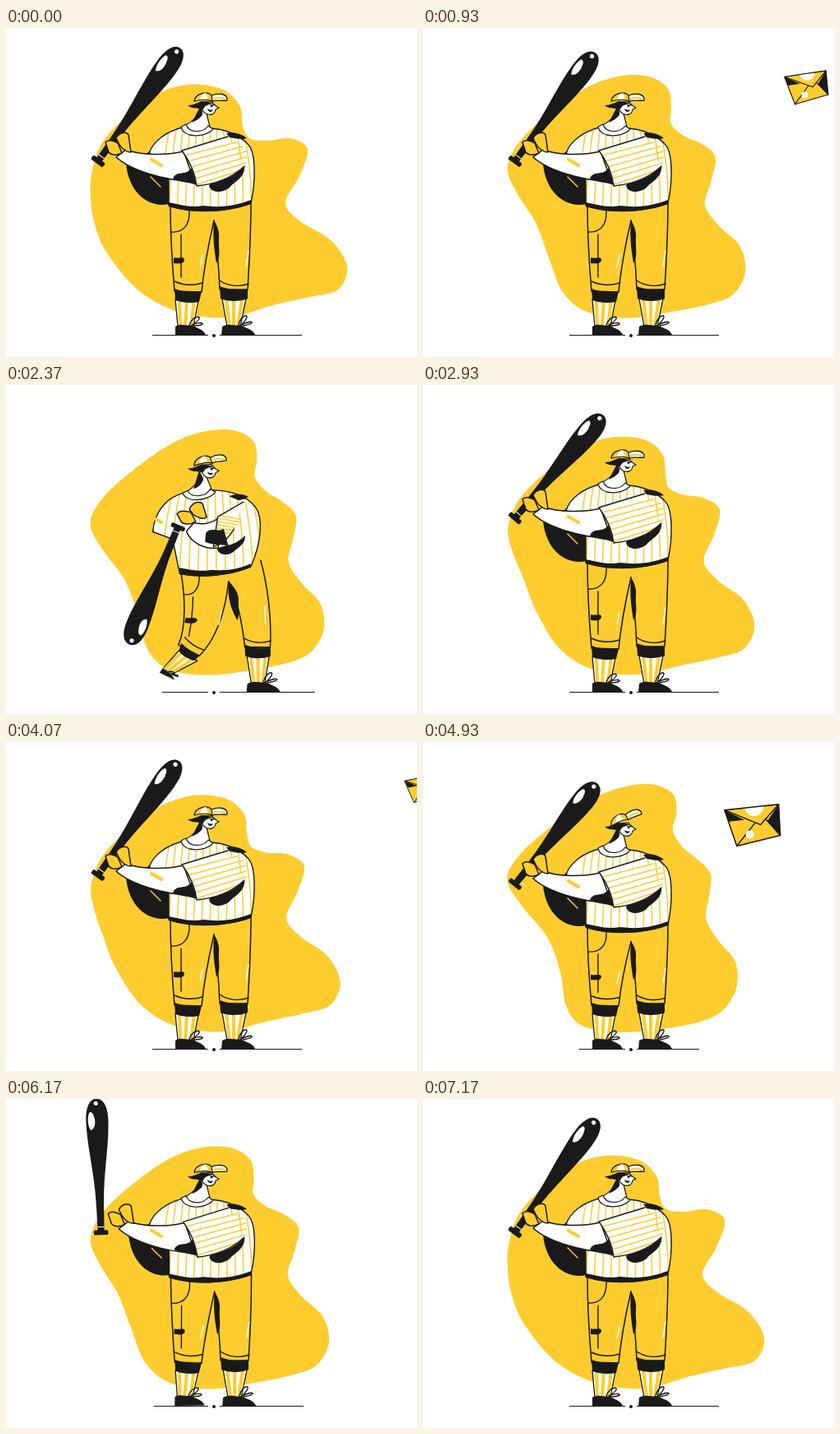
These frames come from a looping animation (500x400 px, 7.21 s). An HTML page with a canvas:

```html
<!DOCTYPE html>
<html lang="en">
<head>
<meta charset="utf-8">
<title>Batter</title>
<style>
html, body { margin: 0; width: 100%; height: 100%; overflow: hidden; background: #fff; }
canvas { display: block; }
</style>
</head>
<body>
<canvas id="stage" width="500" height="400"></canvas>
<script>
const ctx = document.getElementById('stage').getContext('2d');
const YELLOW = '#fdcc2f', BLACK = '#1a1a1a', WHITE = '#fff';
const LOOP = 7210, CYCLE = LOOP / 2;
const clamp = v => Math.max(0, Math.min(1, v));
const lerp = (a, b, k) => a + (b - a) * k;

// Monotone cubic through [time, value] keys
function track(...keys) {
  const n = keys.length;
  const rate = i => (keys[i + 1][1] - keys[i][1]) / (keys[i + 1][0] - keys[i][0]);
  const slope = keys.map((_, i) => {
    if (!i || i === n - 1) return 0;
    const a = rate(i - 1), b = rate(i);
    return a * b <= 0 ? 0 : 2 * a * b / (a + b);
  });
  return t => {
    if (t <= keys[0][0]) return keys[0][1];
    if (t >= keys[n - 1][0]) return keys[n - 1][1];
    let i = 0;
    while (t > keys[i + 1][0]) i++;
    const [t0, a] = keys[i], [t1, b] = keys[i + 1];
    const h = t1 - t0, k = (t - t0) / h, k2 = k * k, k3 = k2 * k;
    return a * (2 * k3 - 3 * k2 + 1) + b * (3 * k2 - 2 * k3)
      + h * (slope[i] * (k3 - 2 * k2 + k) + slope[i + 1] * (k3 - k2));
  };
}

const motion = {
  blob: track([0, 0], [930, .6], [1330, .89], [1800, 1], [1930, .99], [2930, .31], [CYCLE, 0]),
  swing: track([1500, 0], [1600, .28], [1650, .75], [1690, 1], [2130, 1], [2270, .7], [2400, .32], [2600, 0]),
  drop: track([950, 0], [1330, 9], [1480, 9], [1680, 0]),
  angle: track([0, -54], [180, -55], [930, -53.4], [1330, -50.7], [1480, -75], [1560, -132], [1600, -185],
    [1640, -270], [1690, -370], [1750, -404], [1930, -399.3], [2130, -399], [2270, -325], [2380, -240],
    [2470, -160], [2560, -95], [2690, -46], [2930, -49.4], [CYCLE, -54]),
  length: track([0, 170], [180, 172], [930, 164], [1330, 158], [1600, 160], [1750, 129], [2130, 129],
    [2470, 162], [2930, 165], [CYCLE, 170]),
  left: track([930, 178], [1330, 190], [1750, 198], [2150, 198], [2650, 178]),
  right: track([930, 360], [1330, 336], [1500, 336], [1700, 387], [2150, 387], [2650, 360]),
  mailX: track([40, 525], [930, 468], [1330, 402], [1660, 338], [1760, 450]),
  mailY: track([40, 50], [930, 72], [1330, 101], [1660, 150], [1760, 80]),
  mailSize: track([40, .55], [930, .77], [1330, 1], [1660, 1.15], [1760, .1]),
  speed: track([1740, 0], [1860, 1], [2000, 1], [2150, 0]),
  dust: track([1700, 0], [1850, 1], [2000, 1], [2180, 0])
};

const blobRest = [103,205, 104,178, 115,143, 140,113, 178,83, 220,69, 262,74, 284,94, 288,119, 296,134, 318,137,
  345,134, 367,147, 357,180, 340,213, 358,235, 395,258, 415,290, 404,318, 370,327, 325,337, 270,352, 210,345,
  160,318, 122,272, 107,235];
const blobLean = [122,198, 102,165, 119,135, 160,100, 210,67, 250,52, 283,49, 307,60, 311,82, 305,104, 315,126,
  334,145, 348,163, 347,188, 345,216, 361,244, 378,268, 377,300, 360,327, 335,341, 290,350, 235,353, 192,345,
  176,322, 173,282, 157,238];

let swing = 0, drop = 0;

// Blends two path strings of equal structure; drop presses the upper body down
function blend(a, b = a) {
  const to = b.match(/-?[\d.]+/g);
  let i = 0;
  return new Path2D(a.replace(/-?[\d.]+/g, n => {
    let v = lerp(+n, +to[i], swing);
    if (i++ % 2) v += drop * clamp((315 - v) / 85);
    return v.toFixed(2);
  }));
}
function paint(p, fill, line, width = 1.5) {
  if (fill) { ctx.fillStyle = fill; ctx.fill(p); }
  if (line) { ctx.strokeStyle = line; ctx.lineWidth = width; ctx.stroke(p); }
}
const shape = (a, b, fill, line, width) => paint(blend(a, b), fill, line, width);
const ink = (a, b) => shape(a, b, BLACK);
const line = (a, b, color = BLACK, width = 1.4) => shape(a, b, null, color, width);
function dot(x, y, r, color) {
  ctx.fillStyle = color;
  ctx.beginPath();
  ctx.arc(x, y, r, 0, 7);
  ctx.fill();
}

function drawBlob(k) {
  const p = [], n = blobRest.length / 2;
  for (let i = 0; i < n; i++)
    p.push([0, 1].map(j => lerp(blobRest[2 * i + j], blobLean[2 * i + j], k)));
  const at = i => p[(i + n) % n];
  ctx.beginPath();
  ctx.moveTo(...p[0]);
  for (let i = 0; i < n; i++) {
    const [a, b, c, d] = [at(i - 1), at(i), at(i + 1), at(i + 2)];
    ctx.bezierCurveTo(b[0] + (c[0] - a[0]) / 6, b[1] + (c[1] - a[1]) / 6,
      c[0] - (d[0] - b[0]) / 6, c[1] - (d[1] - b[1]) / 6, c[0], c[1]);
  }
  ctx.fillStyle = YELLOW;
  ctx.fill();
}

function drawGround(t) {
  ctx.fillStyle = BLACK;
  const l = motion.left(t), r = motion.right(t);
  ctx.fillRect(l, 373, 246 - l, 1);
  ctx.fillRect(260, 373, r - 260, 1);
  dot(253, 374, 2, BLACK);
}

function drawSock(a, b, stripes) {
  shape(a, b, WHITE, BLACK, 1.3);
  ctx.save();
  ctx.clip(blend(a, b));
  for (const [from, to] of stripes) line(from, to, YELLOW, 4);
  ctx.restore();
}

function drawLegs() {
  drawSock('M206 330 L234 331 L228 363 L209 363 Z', 'M217 312 L231 342 L165 332 L163 317 Z', [
    ['M211 330 L212 363', 'M218 317 L163 319'],
    ['M220 330 L218 363', 'M223 326 L164 325'],
    ['M229 330 L225 363', 'M228 336 L165 330']]);
  drawSock('M263 329 L292 329 L285 363 L269 363 Z', 'M340 330 L364 330 L361 364 L344 364 Z', [
    ['M268 329 L272 363', 'M344 330 L347 364'],
    ['M277 329 L277 363', 'M352 330 L353 364'],
    ['M287 329 L282 363', 'M360 330 L359 364']]);
  shape('M200 212 L253 237 L298 211 Z', 'M232 243 L298 249 L330 216 Z', YELLOW);
  shape('M200 214 C200 250 202 285 205 320 L238 321 C241 290 247 260 253 234',
    'M232 245 C246 268 247 306 217 310 L231 342 C275 342 298 305 298 246', YELLOW, BLACK);
  shape('M253 234 C257 265 259 295 260 318 L294 318 C296 285 298 250 298 212',
    'M298 246 C325 265 333 295 338 320 L364 320 C366 285 350 235 328 215', YELLOW, BLACK);
  if (swing > .8) line('M176 310 C188 311 202 312 217 310');
  ink('M253 234 C257 240 260 248 259 256 C258 266 262 278 256 286 C254 272 251 258 253 234 Z',
    'M298 245 C306 251 318 258 320 266 C319 272 322 280 320 286 C310 279 297 274 298 245 Z');
  line('M205 308 C216 313 229 313 239 310', 'M237 305 C235 315 238 330 243 341');
  line('M260 307 C270 314 284 315 295 311', 'M336 309 C345 313 355 314 364 311');
  ink('M205 317 C216 321 228 322 238 320 L235 333 C225 335 214 334 206 331 Z',
    'M226 309 C226 320 229 333 233 342 L219 339 C216 330 216 322 217 312 Z');
  ink('M260 314 C270 318 283 319 294 317 L294 329 C285 333 270 333 261 329 Z',
    'M337 318 C346 322 356 323 365 320 L365 331 C356 334 347 333 338 330 Z');
  line('M223 222 C224 240 215 249 201 248', 'M254 246 C254 262 248 267 241 265');
  line('M213 251 C213 268 213 285 213 303', 'M250 268 C249 280 245 298 237 309');
  ink('M204 279 C209 281 217 277 217 282 C216 288 208 286 204 286 Z',
    'M241 289 C247 290 256 287 257 292 C254 297 244 294 238 294 Z');
  line('M239 276 L236 291', 'M297 275 L294 292', WHITE);
  line('M295 271 L292 290', 'M346 265 L352 290', WHITE);
  ink('M206 363 C212 358 222 363 226 361 C234 366 240 366 243 373 L206 374 Z',
    'M166 317 C163 325 160 330 157 333 C155 338 150 341 146 336 L157 312 Z');
  ink('M263 363 C270 358 282 363 285 361 C294 366 300 366 303 373 L262 374 Z',
    'M341 364 C348 359 358 363 362 361 C372 366 378 367 381 373 L340 374 Z');
  line('M223 361 C228 346 246 350 226 361 C240 355 246 362 228 362',
    'M157 333 C150 345 160 352 160 336 C166 345 164 352 158 335');
  line('M283 361 C286 346 302 346 286 361 C300 354 306 359 288 362',
    'M360 361 C364 346 380 346 364 361 C378 354 384 359 366 362');
}

function drawBackArm() {
  ink('M172 152 C182 142 190 148 200 156 C200 180 199 200 198 214 C178 219 150 205 146 165 C142 158 150 152 172 152 Z',
    'M186 218 C188 198 202 190 218 198 C250 210 310 210 350 184 C372 180 374 190 358 194 C320 222 270 245 232 237 Z'
      .replace('Z', 'Z'));
  line('M176 181 L188 193', 'M263 217 L272 208', YELLOW);
}

function drawTorso() {
  const a = 'M214 121 C195 126 178 138 174 153 L198 160 L198 216 C228 226 268 224 298 213 C304 185 304 150 294 141 C284 130 266 123 250 122 Z';
  const b = 'M220 147 C200 152 184 175 186 218 L210 230 L232 250 C255 249 280 242 298 232 C320 205 328 180 318 160 C305 140 280 137 258 137 Z';
  shape(a, b, WHITE);
  ctx.save();
  ctx.clip(blend(a, b));
  for (let i = 0; i < 12; i++)
    line(`M${200 + 8 * i} 118 C${194 + 9 * i} 145 ${190 + 10 * i} 180 ${188 + 10 * i} 225`,
      `M${210 + 9 * i} 140 C${200 + 11 * i} 165 ${194 + 12 * i} 190 ${190 + 13 * i} 240`, YELLOW, 1.5);
  ctx.restore();
  line(a, b);
  ink('M198 212 C210 214 222 219 240 216 C262 219 280 216 298 209 L298 214 C268 225 228 226 198 217 Z',
    'M230 238 C240 238 255 242 265 238 C278 238 288 236 297 230 L298 234 C280 244 255 250 233 251 Z');
  ink('M247 191 C258 183 272 188 290 167 C292 182 276 188 272 194 C262 202 248 200 247 191 Z',
    'M272 212 C278 210 285 212 292 208 C292 212 288 215 284 217 C280 218 275 217 272 212 Z');
}

function drawHead() {
  shape('M236 98 C235 106 228 113 217 119 C222 130 243 129 248 120 L244 104',
    'M236 118 C238 130 232 140 223 147 C231 155 250 150 254 139 L244 124', WHITE, BLACK, 1.2);
  ink('M236 96 C239 100 240 104 238 107 C235 110 231 113 226 115 Z',
    'M233 118 C238 124 240 128 243 127 C244 136 240 142 231 144 Z');
  shape('M213 120 C216 134 242 134 252 123 L246 119 C240 128 222 128 219 117 Z',
    'M218 148 C222 158 252 154 259 141 L252 138 C250 148 230 154 225 146 Z', WHITE, BLACK, 1.2);
  ctx.save();
  ctx.translate(0, 19 * swing);
  shape('M250 89 C252 93 254 94 259 97 L255 99 C254 105 249 107 243 104 C239 102 237 97 238 90 Z', undefined, WHITE, BLACK, 1.2);
  ink('M221 94 C228 94 232 91 238 89 L253 91 C246 94 242 93 240 99 C234 97 226 99 221 94 Z');
  line('M249 94 L254 93.5');
  dot(250, 95 + drop, 1.2, BLACK);
  ink('M245 98 C248 100 250 100 252 99 C251 103 246 103 245 98 Z');
  const tilt = -.36 * Math.max(swing, drop / 9);
  ctx.translate(241, 91 + drop);
  ctx.rotate(tilt);
  ctx.translate(-241, -91 - drop);
  shape('M229 89 C230 80 245 75 251 83 L252 89 C244 86 237 87 229 89 Z', undefined, YELLOW, BLACK, 1.2);
  shape('M236 87 C237 82 240 79 243 79 L246 86 Z', undefined, WHITE);
  shape('M250 82 C258 79 270 79 269 88 C262 89 256 87 251 89 Z', undefined, WHITE, BLACK, 1.3);
  line('M253 86 C258 84 263 85 266 86', undefined, YELLOW, 2);
  ctx.restore();
}

function drawFrontArm() {
  shape('M216 150 C195 155 165 155 146 148 L134 157 C150 172 195 187 229 186 Z',
    'M324 180 C335 190 350 193 357 198 L352 210 C340 224 322 223 304 216 Z', WHITE, BLACK);
  if (swing < .5) line('M177 160 L189 167', undefined, YELLOW, 4);
  const a = 'M270 132 L214 149 C222 160 230 175 232 192 C255 190 275 182 290 168';
  const b = 'M318 158 L325 178 C310 182 292 190 284 204 C278 198 266 190 258 186';
  shape(a, b, WHITE);
  ctx.save();
  ctx.clip(blend(a + ' L300 150 Z', b + ' L300 160 Z'));
  for (let i = 0; i < 6; i++)
    line(`M214 ${156 + 8 * i} L292 ${136 + 7 * i}`, `M${266 + 10 * i} 150 L${272 + 9 * i} 205`, YELLOW, 1.5);
  ctx.restore();
  line(a, b);
  ink('M203 183 C208 172 218 181 226 170 L232 191 C222 187 212 188 203 183 Z',
    'M305 176 C312 172 320 177 325 182 L330 202 C322 205 312 205 303 203 Z');
  ink('M268 128 C276 126 286 128 293 134 C286 136 278 134 272 133 Z',
    'M277 147 C283 141 292 138 298 139 C296 144 297 148 299 151 Z');
}

function drawBat(t) {
  ctx.save();
  ctx.translate(lerp(112, 360, swing), lerp(162, 189, swing) + drop * 1.2);
  ctx.rotate(motion.angle(t) * Math.PI / 180);
  ctx.scale(motion.length(t) / 170, 1);
  paint(new Path2D('M0 -4 L30 -4.5 C75 -5 105 -13 140 -13.5 C160 -14 170 -8 170 0 C170 8 160 14 140 13.5 C105 13 75 5 30 4.5 L0 4 Z'), BLACK);
  paint(new Path2D('M-3 -8 Q0 -10 3 -8 L3 8 Q0 10 -3 8 Z'), BLACK);
  line('M7 -4 L7 4', undefined, WHITE, 1);
  paint(new Path2D('M130 -8 C136 -12 148 -12 153 -9 C154 -4 146 -4 145 -3 C138 -2 132 -3 130 -8 Z'), WHITE);
  ctx.restore();
  ctx.save();
  ctx.translate(lerp(112, 360, swing), lerp(162, 189, swing) + drop * 1.2);
  ctx.rotate(motion.angle(t) * Math.PI / 180);
  dot(motion.length(t) * .965, -1, 2.6, WHITE);
  ctx.restore();
}

function drawGloves() {
  shape('M134 134 C138 126 147 126 149 130 L152 151 C146 151 140 146 137 140 Z',
    'M361 178 C366 164 376 165 379 167 L387 176 C385 184 374 184 368 184 Z', YELLOW, BLACK);
  shape('M121 139 C124 135 131 137 136 140 L141 152 C134 156 127 154 125 151 Z',
    'M343 184 C350 176 356 180 362 177 L370 187 C364 194 352 192 350 190 Z', YELLOW, BLACK);
}

function drawMail(t) {
  if (t < 40 || t > 1755) return;
  const k = motion.mailSize(t);
  ctx.save();
  ctx.translate(motion.mailX(t), motion.mailY(t));
  ctx.rotate((1330 - t) * -.0001);
  ctx.scale(k, k);
  const body = new Path2D('M-36 -18 L30 -25 L32 13 L-21 26 Z');
  paint(body, YELLOW);
  ctx.save();
  ctx.clip(body);
  paint(new Path2D('M-36 -18 L-12 -6 L-31 -4 Z M30 -25 L16 -4 L34 14 Z'), BLACK);
  paint(new Path2D('M-36 -18 L8 0 L30 -25 Z'), YELLOW, BLACK);
  ctx.clip(new Path2D('M-36 -18 L8 0 L30 -25 Z'));
  dot(0, -22, 11.5, WHITE);
  ctx.restore();
  paint(new Path2D('M-21 26 L1 -2 M32 13 L15 -6'), null, BLACK);
  dot(-5, 12, 5, WHITE);
  paint(body, null, BLACK);
  ctx.restore();
}

function drawEffects(t) {
  const k = motion.speed(t), d = motion.dust(t);
  if (k > 0) {
    ctx.strokeStyle = BLACK;
    ctx.lineWidth = 1;
    ctx.beginPath();
    for (const [x, y, w, h] of [[386, 75, 23, -14], [411, 70, 8, -4], [420, 98, 13, -8], [407, 115, 25, -12]]) {
      const from = t > 1950 ? 1 - k : 0, to = t > 1950 ? 1 : k;
      ctx.moveTo(x + w * from, y + h * from);
      ctx.lineTo(x + w * to, y + h * to);
    }
    ctx.stroke();
  }
  if (d > 0)
    for (const [x, y, r] of [[142, 302, 3], [130, 315, 2.2], [138, 307, 1], [134, 328, 1.2], [156, 308, 1]])
      dot(lerp(157, x, d), lerp(325, y, d), r * d, BLACK);
}

function frame(now) {
  const t = (now % LOOP) % CYCLE;
  swing = motion.swing(t);
  drop = motion.drop(t);
  ctx.fillStyle = WHITE;
  ctx.fillRect(0, 0, 500, 400);
  ctx.lineCap = ctx.lineJoin = 'round';
  drawBlob(motion.blob(t));
  drawGround(t);
  drawLegs();
  const through = swing > .5;
  if (!through) drawBackArm();
  drawTorso();
  drawHead();
  if (!through) drawBat(t);
  drawFrontArm();
  if (through) {
    drawBat(t);
    drawBackArm();
  }
  drawGloves();
  drawMail(t);
  drawEffects(t);
}

const start = performance.now();
function tick() {
  frame(performance.now() - start);
  requestAnimationFrame(tick);
}
tick();
</script>
</body>
</html>
```
